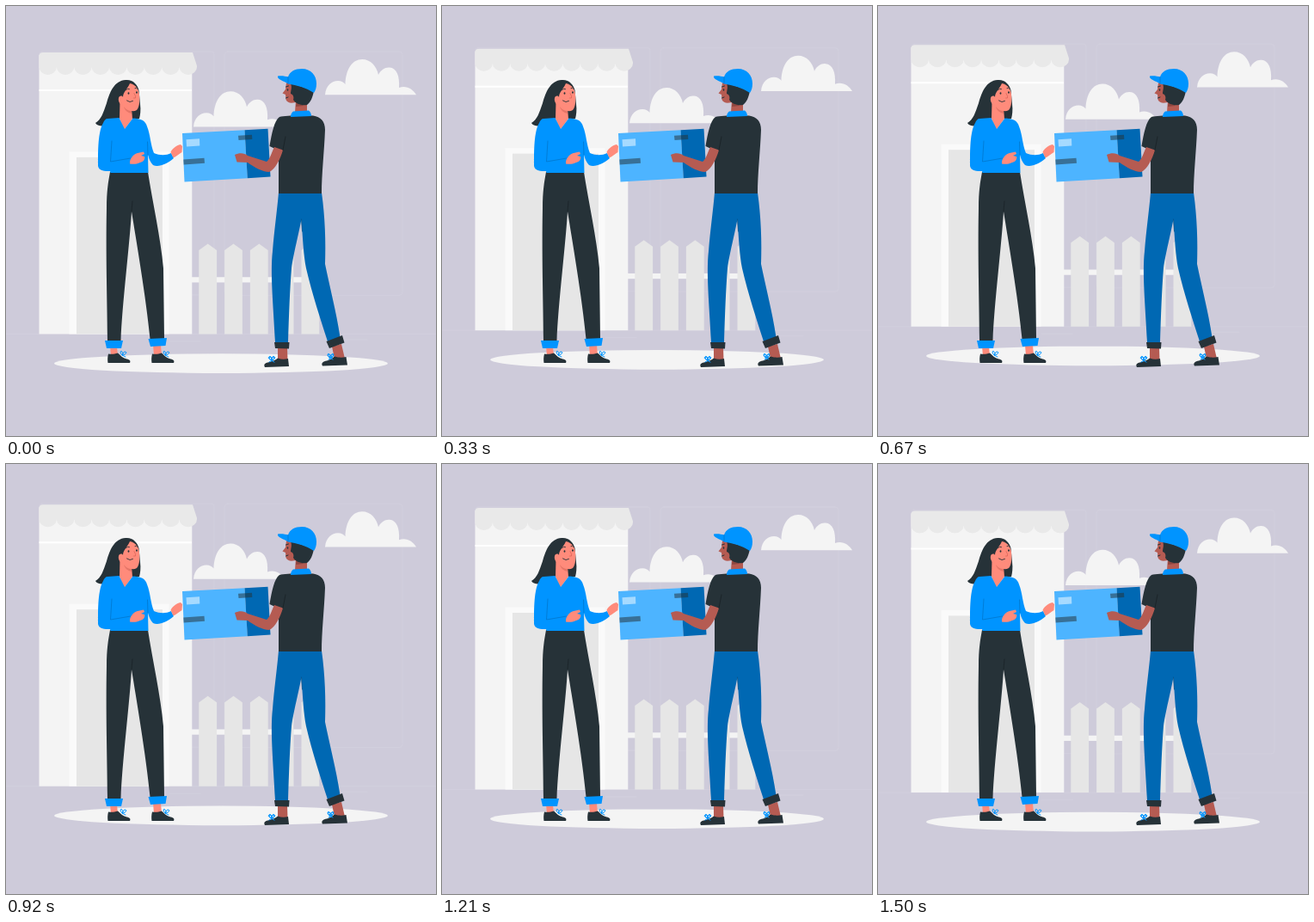
Write an HTML page that moves like this. It is 500 px wide and 500 px high and loops after 1540 ms.

```html
<!DOCTYPE html>
<html lang="en">
<head>
<meta charset="utf-8">
<title>Parcel delivery</title>
<style>
html, body { margin: 0; width: 100%; height: 100%; overflow: hidden; background: #cecbda; }
svg { display: block; width: 100vw; height: 100vh; }
.blue { fill: #0094ff; }
.navy { fill: #0068b3; }
.dark { fill: #263238; }
.skin { fill: #ff8b7b; }
.tan { fill: #b55b52; }
.pale { fill: #f4f4f4; }
.grey { fill: #e6e6e6; }
.line { fill: none; stroke-linecap: round; stroke-linejoin: round; }
.lace { stroke: #0094ff; stroke-width: 1; }
</style>
</head>
<body>
<svg viewBox="0 0 500 500">
  <defs>
    <path id="cloud" class="pale" d="M371 103.3C372 92 379 87 386 87C390 87 393 89 394.5 91C395 73 403 62 414 62C424 62 431 70 433 80C436 74 441 71 446 71.5C454 72 458 81 457 95C465 92 473 96 477 103.3Z"/>
    <path id="shoe" class="dark" d="M119 404.5C118 408 118 412 118.500 415L144 415C145.500 412 143 411 139 410C135 409 132 405 130 403.500C126 405 122 405 119 404.5Z"/>
    <path id="lace" class="line lace" d="M0 0C-3 -3 -2 -6 0 -4C2 -2 1 0 0 0C1 -4 4 -5 5 -3C4 -1 2 0 0 0L4 2"/>
  </defs>

  <g id="scene">
    <g class="line" stroke="#d4d1df" stroke-width=".8">
      <path d="M0 381.500H500M380 388H420M190 390H226"/>
      <rect x="39" y="53" width="203" height="283" rx="3"/>
      <rect x="254" y="53" width="207" height="283.500" rx="4"/>
    </g>
    <ellipse class="pale" cx="250" cy="415.700" rx="194" ry="11.300"/>
    <rect class="pale" x="38.500" y="57" width="177.800" height="324.500"/>
    <path d="M38.500 98H216" stroke="#fff" stroke-width="2"/>
    <rect x="73.500" y="169.500" width="116" height="212" fill="#fafafa"/>
    <rect class="grey" x="82" y="176" width="100" height="205.500"/>
    <path id="awning" fill="#e9e9e9"/>
    <rect class="pale" x="216" y="315.300" width="150" height="6.200"/>
    <g id="fence" class="grey"></g>
    <use href="#cloud"/>
    <use href="#cloud" x="-153" y="37.300"/>
  </g>

  <g id="woman">
    <path class="dark" d="M104 136C111 132 113 124 117 113C121 99 126 87 139 86C147 85 153 91 154.500 98L156 114C157 121 156 127 155 131L130 131C122 132 118 137 112 139.500C108 139.500 105 138 104 136Z"/>
    <path class="skin" d="M132.500 111L132 131L137.500 144L147 131L146 119Z"/>
    <path class="skin" d="M144 90C150 91 154.500 96 155 103C155.700 111 155 118 152 121C147 124 141 121 137.500 116C133 116 130 111 131 107C132 104 135 104 136 106C136 100 141 97 144 90Z"/>
    <path d="M137 117C140 121 143 122 146 122L146 125C141 124 138 121 137 117Z" fill="#e57668"/>
    <g class="line" stroke="#263238" stroke-width=".9">
      <path d="M139.500 97.500Q141.500 95.500 143.500 96.500M150 95.500Q151.500 94.500 153 96"/>
      <path d="M140.500 110Q144 113 147.500 110.500"/>
      <path d="M149 101.500Q151.500 105.500 150.500 107L148.500 107" stroke="#e0695d"/>
    </g>
    <ellipse class="dark" cx="142.500" cy="101.500" rx=".9" ry="1.300"/>
    <ellipse class="dark" cx="152" cy="100.500" rx=".9" ry="1.300"/>

    <path class="dark" d="M121 193L165 193C170 226 180 270 183 305L184 387L167.500 387C163 340 151 270 146 239C144 275 135 348 133.500 389L118 389C117.500 330 116 290 117 235C117 215 119 204 121 193Z"/>
    <path class="line" d="M146 239L147 227" stroke="#1a2327" stroke-width=".8"/>
    <path class="skin" d="M121 396H129L130 407H122ZM171 394H180L181 407H172Z"/>
    <path class="blue" d="M115 389H136L134 398L117 398ZM165.500 387L187 386L185.500 395L168 396Z"/>
    <use href="#shoe"/>
    <use href="#shoe" x="51"/>
    <use href="#lace" x="135" y="406"/>
    <use href="#lace" x="185" y="406"/>

    <path class="blue" d="M118 131L131.500 130L138 143L147.500 130.500C157 131 162 133 164 140C168 150 168 162 172 171C179 174 186 174 192 171L195 177C187 184 177 188 171 185C168 182 166 177 165 173L165.500 194L121.500 194L121 192C115 192 108 192 107 186C107 168 107 146 113 136C114 133 116 131 118 131Z"/>
    <path class="line" d="M123 157L121.500 181L145 177M164.500 158L165 173" stroke="#0076cc" stroke-width=".8"/>
    <path class="skin" d="M144 181C145 176 149 172 153 171L160 169.500L161 172L157 174L161 175C162 178 160 181 156 182C152 184 148 184 144 183.500Z"/>
    <path class="skin" d="M191.500 170C193 166 198 162 203 161L205 163L204.500 170C201 172 198 175 194.500 176.500Z"/>
  </g>

  <g id="parcel">
    <path d="M205 148L277.500 144.300L280.800 200.300L207.500 204.500Z" fill="#4db4ff"/>
    <path class="navy" d="M277.500 144.300L304.500 142.700L307.500 198.500L280.800 200.300Z"/>
    <path d="M209.500 155.300L225 154.300L225.300 162.500L210 163.500Z" fill="#a6daff"/>
    <path class="dark" opacity=".52" d="M206.300 178.500L230.500 176.700L231 182.700L206.700 184.500ZM270 150.800L286 149.800L286.300 155L270.500 156Z"/>
  </g>

  <g id="courier">
    <path class="tan" d="M316 397H327L327.500 412H316ZM379 396L390 393L394 410H382Z"/>
    <path class="navy" d="M317 217L367 217C371 245 372 275 371 300C376 325 384 355 388.500 385L374 390C366 365 356 335 349 305C346 290 345 270 343.500 248C341 262 334 290 332 305C330 330 329 360 328 391L313 391C311 350 307 310 310 285C312 260 315 240 317 217Z"/>
    <path class="line" d="M343.500 248L344.500 262" stroke="#00508a" stroke-width=".8"/>
    <path class="dark" d="M312 391H329.500L329 398.500L313 398ZM372.500 390L391 383L393.500 391.500L376 398Z"/>
    <path class="dark" d="M328 410L329 419L301 420C299 416 302 415 306 414C311 413 314 411 316 409.500C320 411 324 411 328 410ZM395.500 408L397 417.500L368 418.500C366 415 369 413 373 412.500C378 411 380 409 382 407.500C387 409 391 409 395.500 408Z"/>
    <use href="#lace" transform="translate(310 412) scale(-1 1)"/>
    <use href="#lace" x="308" y="412"/>
    <use href="#lace" transform="translate(379 409) scale(-1 1)"/>
    <use href="#lace" x="376" y="409"/>

    <path class="tan" d="M337 109L350 112L350 124L336 124Z"/>
    <path d="M338 111L346 116L337 117Z" fill="#8f463f"/>
    <path class="tan" d="M326 89L325 97L321.500 101.500L325 103L325.500 109C328 114 334 113 340 111L342 92Z"/>
    <path class="dark" d="M331 90L358 98C357 106 354 112 350 115C344 116 337 114 334 109C335 106 334 103 331 102C331 98 333 95 331 90Z"/>
    <path class="line" d="M325.500 94L328.500 93M325.500 107L328 106" stroke="#263238" stroke-width="1"/>
    <ellipse class="dark" cx="327.500" cy="97.500" rx=".8" ry="1.300"/>
    <path class="blue" d="M316 81.500C320 80.700 325 81.500 328 82.500C330 76 336 73 344 73C355 73 361 81 361 90C361 95 360 98 358 101C349 95 338 92 328 90.500C324 87.500 318 86.500 316 83Z"/>
    <path class="line" d="M328 82.500L328 90" stroke="#0076cc" stroke-width=".8"/>
    <path class="dark" d="M318 129C325 127 342 127 357 127.500C366 129 371 134 371 144C370 170 367 195 367 218L317 218L317 168L306.500 163C309 148 312 133 318 129Z"/>
    <path class="blue" d="M334 122.500L352 121.500C354 123 355 126 355 128L331 129C331 126 332 124 334 122.500Z"/>
    <path class="tan" d="M312 164L322 167.500C319 178 313 190 306 193C298 193 288 187 281 182L268.500 181.500L266 173C271 170.500 277 170.500 281 174L303 181C307 178 309 170 312 164Z"/>
    <path class="line" d="M322 167.500L325 152" stroke="#182125" stroke-width=".8"/>
  </g>
</svg>
<script>
const LOOP = 1540, LOW = 720, TRAVEL = 10;
const byId = id => document.getElementById(id);
const scene = byId("scene");

function drawAwning() {
  const count = 9, width = 183.5 / count;
  let d = "M38.500 71V58Q38.500 54 43 54H217L222 69.500V71";
  for (let i = 0; i < count; i++) d += `a${width / 2} 9 0 0 1 ${-width} 0`;
  byId("awning").setAttribute("d", d + "Z");
}

function drawFence() {
  let d = "";
  for (let i = 0; i < 5; i++) {
    d += `M${224.3 + i * 29.8} 381.500v-97.500l10.400 -7.500l10.400 7.500v97.500Z`;
  }
  byId("fence").innerHTML = `<path d="${d}"/>`;
}

// Steady rise and fall of everything behind the two people.
function render(ms) {
  const t = ms % LOOP;
  const gap = Math.abs(t - LOW);
  const fromLow = Math.min(gap, LOOP - gap) / (LOOP / 2);
  const y = TRAVEL * (fromLow - 1) + 0.6;
  scene.setAttribute("transform", `translate(0 ${y.toFixed(3)})`);
}

drawAwning();
drawFence();
const start = performance.now();
function tick() {
  render(performance.now() - start);
  requestAnimationFrame(tick);
}
tick();
</script>
</body>
</html>
```
